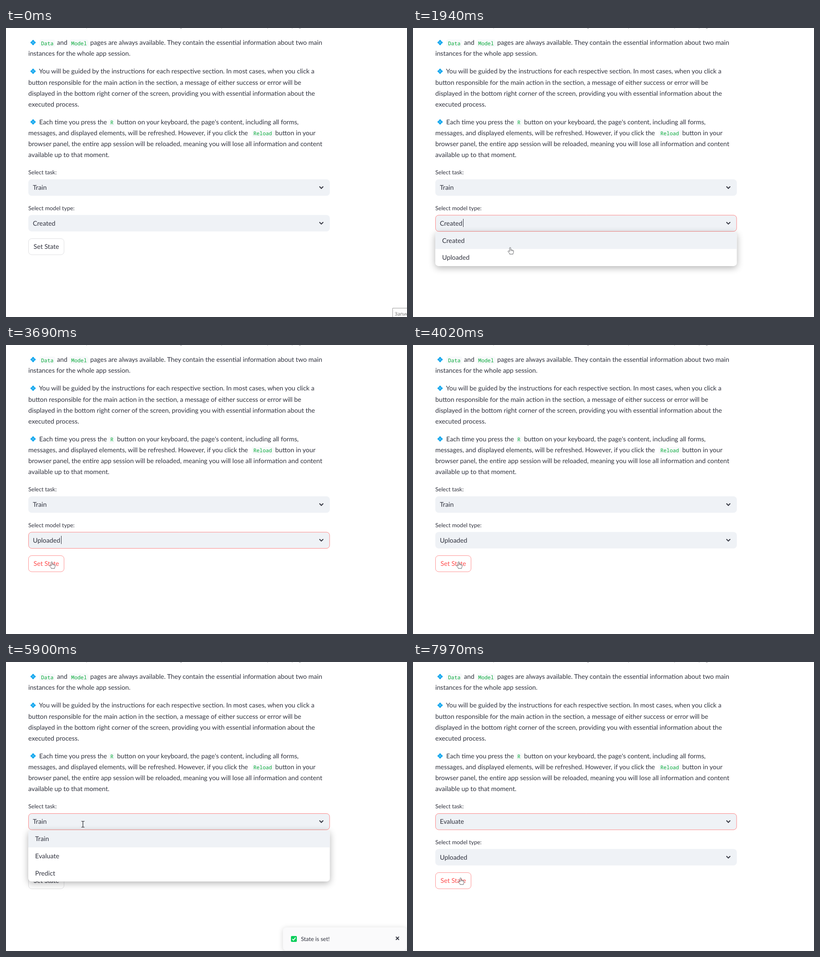
These frames come from a looping animation (881x636 px, 8 s). An HTML page with a canvas:

```html
<!DOCTYPE html>
<html lang="en">
<head>
<meta charset="utf-8">
<title>Set state</title>
<style>
html, body { margin: 0; width: 100%; height: 100%; overflow: hidden; background: #fff; }
canvas { display: block; width: 881px; height: 636px; }
</style>
</head>
<body>
<canvas id="stage" width="881" height="636"></canvas>
<script>
const ctx = document.getElementById('stage').getContext('2d');
const LOOP = 8000;
const INK = '#31333f', RED = '#ff4b4b', PALE = '#eff2f6', GREEN = '#09ab3b';
const BODY = '14.25px Lato, sans-serif';
const SMALL = '12.55px Lato, sans-serif';
const CODE = '11.4px "Noto Sans Mono", monospace';
const LEFT = 49, RIGHT = 711.5, ROW = 37.6, LINE = 24.1;

const between = (t, a, b) => t >= a && t < b;
const inside = (p, x, y, w, h) => p.x >= x && p.x < x + w && p.y >= y && p.y < y + h;

function text(str, x, y, font = BODY, color = INK) {
  ctx.font = font;
  ctx.fillStyle = color;
  ctx.fillText(str, x, y);
}

function box(x, y, w, h, r, fill, stroke) {
  ctx.beginPath();
  ctx.roundRect(x, y, w, h, r);
  if (fill) { ctx.fillStyle = fill; ctx.fill(); }
  if (stroke) { ctx.strokeStyle = stroke; ctx.lineWidth = 1; ctx.stroke(); }
}

function shadow(blur, dy, color) {
  ctx.shadowBlur = blur;
  ctx.shadowOffsetY = dy;
  ctx.shadowColor = color;
}

function line(points, color, width) {
  ctx.beginPath();
  points.forEach(([x, y], i) => i ? ctx.lineTo(x, y) : ctx.moveTo(x, y));
  ctx.strokeStyle = color;
  ctx.lineWidth = width;
  ctx.stroke();
}

// ---- static page ----

function bullet(y) {
  ctx.fillStyle = '#0ba5ee';
  for (const [dx, dy] of [[0, -3.2], [3.2, 0], [0, 3.2], [-3.2, 0]]) {
    ctx.save();
    ctx.translate(59.5 + dx, y - 5.2 + dy);
    ctx.rotate(Math.PI / 4);
    ctx.fillRect(-2.1, -2.1, 4.2, 4.2);
    ctx.restore();
  }
}

function chip(str, x, y) {
  ctx.font = CODE;
  box(x - 3.5, y - 12, ctx.measureText(str).width + 7, 16.5, 3.5, '#f8f9fb');
  text(str, x, y + 0.3, CODE, GREEN);
}

function lines(y, list) {
  list.forEach((str, i) => text(str, LEFT, y + i * LINE));
}

function copy() {
  const clipped = [[', y', 168], ['g', 381], ['p', 472], [',', 503], ['p', 573], ['page', 627]];
  for (const [str, x] of clipped) text(str, x, -1.9);

  let y = 37.2;
  bullet(y);
  chip('Data', 77, y);
  text('and', 112, y);
  chip('Model', 143.3, y);
  text('pages are always available. They contain the essential information about two main', 185, y);
  lines(y + LINE, ['instances for the whole app session.']);

  y = 100.4;
  bullet(y);
  text('You will be guided by the instructions for each respective section. In most cases, when you click a', 72.5, y);
  lines(y + LINE, [
    'button responsible for the main action in the section, a message of either success or error will be',
    'displayed in the bottom right corner of the screen, providing you with essential information about the',
    'executed process.'
  ]);

  y = 211.9;
  bullet(y);
  text('Each time you press the', 73, y);
  chip('R', 229.3, y);
  text("button on your keyboard, the page's content, including all forms,", 244, y);
  lines(y + LINE, [
    'messages, and displayed elements, will be refreshed. However, if you click the',
    'browser panel, the entire app session will be reloaded, meaning you will lose all information and content',
    'available up to that moment.'
  ]);
  chip('Reload', 543.4, y + LINE);
  text('button in your', 591.5, y + LINE);

  text('Select task:', LEFT, 321.7, SMALL);
  text('Select model type:', LEFT, 400.7, SMALL);
}

// ---- widgets ----

const TASK = { y: 333, options: ['Train', 'Evaluate', 'Predict'] };
const KIND = { y: 411.4, options: ['Created', 'Uploaded'] };
const SELECT_H = 36.3;
const BUTTON = [49, 463, 79, 36.5];

const menuTop = s => s.y + SELECT_H + 1;
const menuRect = s => [LEFT, menuTop(s), RIGHT - LEFT, ROW * s.options.length];

function select(s, value, focused, caret) {
  const base = s.y + 23.3, mid = s.y + 18;
  if (focused) box(LEFT + 0.5, s.y + 0.5, RIGHT - LEFT - 1, SELECT_H - 0.6, 7, PALE, 'rgba(255,75,75,.65)');
  else box(LEFT, s.y, RIGHT - LEFT, SELECT_H, 7.5, PALE);
  text(value, 59, base);
  if (caret) {
    const x = Math.round(59 + ctx.measureText(value).width + 1.8);
    ctx.fillStyle = INK;
    ctx.fillRect(x, Math.round(base - 14.3), 1, 18);
  }
  line([[688.6, mid - 2.2], [692.8, mid + 2], [697, mid - 2.2]], INK, 2);
}

function menu(s, value, p) {
  const [x, y, w, h] = menuRect(s);
  const active = inside(p, x, y, w, h) ? Math.floor((p.y - y) / ROW) : s.options.indexOf(value);
  ctx.save();
  shadow(15, 4, 'rgba(0,0,0,.3)');
  box(x, y, w, h, 7, '#fff');
  ctx.restore();
  ctx.save();
  ctx.beginPath();
  ctx.roundRect(x, y, w, h, 7);
  ctx.clip();
  s.options.forEach((name, i) => {
    if (i === active) {
      ctx.fillStyle = PALE;
      ctx.fillRect(x, y + i * ROW, w, ROW);
    }
    text(name, 64, y + i * ROW + 24);
  });
  ctx.restore();
}

function button(red, pressed) {
  const [x, y, w, h] = BUTTON;
  box(x + 0.5, y + 0.5, w - 1, h - 1, 7, pressed ? RED : '#fff', red ? 'rgba(255,75,75,.6)' : 'rgba(49,51,63,.15)');
  ctx.textAlign = 'center';
  text('Set State', x + w / 2, 486.4, BODY, pressed ? '#fff' : red ? RED : INK);
  ctx.textAlign = 'left';
}

function toast(alpha) {
  ctx.save();
  ctx.globalAlpha = alpha;
  ctx.save();
  shadow(12, 2, 'rgba(0,0,0,.17)');
  box(608.5, 584, 271.5, 51, 7, '#fafafb');
  ctx.restore();
  box(626, 603, 13, 13, 2, '#0cce5b');
  line([[629, 609.6], [631.6, 612.2], [636.2, 606.4]], '#fff', 1.8);
  text('State is set!', 648, 614, SMALL);
  line([[856.6, 604.7], [863.4, 611.5]], INK, 1.9);
  line([[863.4, 604.7], [856.6, 611.5]], INK, 1.9);
  ctx.restore();
}

function tooltip() {
  box(849.5, 616.5, 60, 40, 0, '#fff', '#999');
  text('Запись', 854, 633, '10.6px "Open Sans", sans-serif', '#6c6c6c');
}

// ---- pointer ----

// start, end, steps, x, y, ease-out power
const MOVES = [
  [610, 1270, 11, 262, 436, 1.4],
  [1610, 1940, 6, 214, 485, 1],
  [2010, 2140, 3, 207.5, 500, 1.2],
  [2750, 3430, 10, 102, 478, 1.4],
  [3560, 3690, 2, 101, 479, 1],
  [5160, 5160, 1, 118, 469, 1],
  [5230, 5630, 7, 169, 357, 1.3],
  [6230, 6490, 5, 140, 436, 1.3],
  [7640, 7970, 6, 105, 477, 1.3]
];
const CLICKS = [[1480, 1610], [2340, 2480], [3890, 4020], [5770, 5900], [6900, 7100]];

function pointer(t) {
  const p = { x: 897, y: 658 };
  for (const [start, end, n, x, y, power] of MOVES) {
    if (t < start) break;
    const gap = n > 1 ? (end - start) / (n - 1) : 1;
    const step = Math.min(n, Math.floor((t - start) / gap + 0.12) + 1);
    const u = 1 - Math.pow(1 - step / n, power);
    p.x += (x - p.x) * u;
    p.y += (y - p.y) * u;
  }
  return p;
}

const HAND = new Path2D('M-1.5 1.4Q-1.4 0 0 0Q1.4 0 1.5 1.4V5.6Q3 4.8 3.9 6Q5.4 5.5 6.1 6.7' +
  'Q8 6.3 8.2 8V11Q8 12.6 7 13.6V15.5H-1.4V14L-5 9.8Q-5.9 8.5-4.8 7.9Q-3.6 7.3-1.5 9.6Z');
const KNUCKLES = new Path2D('M1.5 5.6V8.6M3.9 6V8.6M6.1 6.7V8.9');
const ARROW = new Path2D('M0 0V12.6L2.9 9.9L4.8 14L6.7 13.2L4.9 9.2H9Z');
const BEAM = new Path2D('M-3.5 -6.5H-1Q0 -6.5 0 -5.5Q0 -6.5 1 -6.5H3.5' +
  'M0 -5.5V5.5M-3.5 6.5H-1Q0 6.5 0 5.5Q0 6.5 1 6.5H3.5');

function cursor(p, kind) {
  ctx.save();
  ctx.translate(Math.round(p.x), Math.round(p.y));
  ctx.strokeStyle = '#26272c';
  ctx.fillStyle = '#fff';
  ctx.lineWidth = 1;
  if (kind === 'text') {
    ctx.lineWidth = 1.2;
    ctx.stroke(BEAM);
  } else if (kind === 'hand') {
    ctx.translate(-0.5, -2);
    ctx.scale(0.9, 0.95);
    ctx.strokeStyle = '#45464b';
    ctx.lineWidth = 0.9;
    ctx.fill(HAND);
    ctx.stroke(HAND);
    ctx.lineWidth = 0.6;
    ctx.stroke(KNUCKLES);
  } else {
    ctx.fill(ARROW);
    ctx.stroke(ARROW);
  }
  ctx.restore();
}

// ---- scene ----

function draw(t) {
  const p = pointer(t);
  const open = between(t, 1610, 2480) ? KIND : between(t, 5900, 7100) ? TASK : null;
  const task = t < 7100 ? 'Train' : 'Evaluate';
  const kind = t < 2480 ? 'Created' : 'Uploaded';
  const overMenu = open && inside(p, ...menuRect(open));
  const overButton = !open && inside(p, ...BUTTON);
  const overSelect = [TASK, KIND].some(s => inside(p, LEFT, s.y, RIGHT - LEFT, SELECT_H));
  const kindCaret = between(t, 1610, 2070) || between(t, 2480, 3010) || between(t, 3560, 3890);
  const taskCaret = between(t, 5970, 6490) || between(t, 7100, 7640);

  ctx.fillStyle = '#fff';
  ctx.fillRect(0, 0, 881, 636);
  copy();
  select(TASK, task, t >= 5840, taskCaret);
  select(KIND, kind, between(t, 1550, 3890), kindCaret);
  button(overButton || between(t, 3890, 5840), between(t, 3890, 4020));
  if (open) menu(open, open === TASK ? task : kind, p);
  if (between(t, 4280, 7380)) toast(Math.min(1, (Math.floor((t - 4280) / 65) + 1) / 3));
  if (t < 120) tooltip();

  if (t < 610) return;
  if (CLICKS.some(([a, b]) => between(t, a, b))) {
    ctx.beginPath();
    ctx.arc(p.x, p.y, 10.3, 0, Math.PI * 2);
    ctx.fillStyle = 'rgba(250,240,50,.75)';
    ctx.fill();
  }
  cursor(p, overMenu || overButton ? 'hand' : overSelect ? 'text' : 'arrow');
}

ctx.textRendering = 'geometricPrecision';
const begin = performance.now();
function tick() {
  draw((performance.now() - begin) % LOOP);
  requestAnimationFrame(tick);
}
tick();
</script>
</body>
</html>
```
